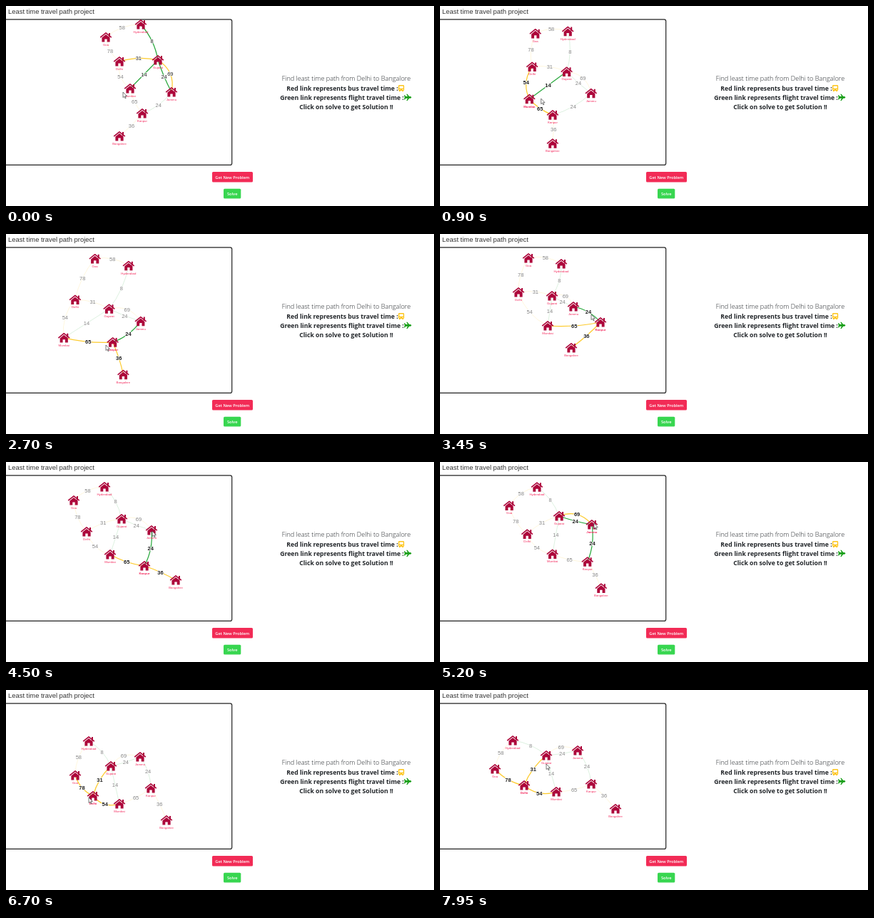
Animation, 600 px wide and 281 px high, one loop 8000 ms. Source, as an HTML page:

```html
<!DOCTYPE html>
<html lang="en">
<head>
<meta charset="utf-8">
<title>Least time travel path project</title>
<style>
  html, body { margin: 0; width: 100%; height: 100%; overflow: hidden; background: #fff; }
  svg { display: block; width: 100vw; height: 100vh; }
  text { text-anchor: middle; }
  .title { font: 9.42px "Liberation Sans", Arial, sans-serif; fill: #333; text-anchor: start; }
  .light { font: 300 9.15px "Open Sans", sans-serif; fill: #212529; }
  .bold { font: 700 8.7px "Open Sans", sans-serif; fill: #212529; }
  .button { font: 600 5.7px "Open Sans", sans-serif; fill: #fff; }
  .city { font: 4.3px "Liberation Sans", Arial, sans-serif; fill: #f3255a; }
  .cost { font: 7.5px "Liberation Sans", Arial, sans-serif; fill: #858585;
          stroke: #fff; stroke-width: 1.4px; paint-order: stroke; }
  .edge { fill: none; stroke-width: .8; opacity: .2; }
  .active .edge { stroke-width: 1.2; opacity: 1; }
  .active .cost { fill: #222; }
  .strong .cost, .strong .city { font-weight: 700; }
</style>
</head>
<body>
<svg viewBox="0 0 600 281" preserveAspectRatio="none">
  <defs>
    <g id="house" fill="#ad063b">
      <path d="M-7.8 .2L0-6.1L7.8 .2" fill="none" stroke="#ad063b" stroke-width="1.6" stroke-linejoin="round"/>
      <path d="M4-6H6V-.5H4ZM-5.6 .6L0-4L5.6 .6V6.6H1.7V2.4H-1.7V6.6H-5.6Z"/>
    </g>
  </defs>
  <text class="title" x="3" y="11.4">Least time travel path project</text>
  <rect x="-5" y="18.8" width="321.7" height="204.6" rx="2.5" fill="none" stroke="#222" stroke-width="1.2"/>

  <text class="light" x="477" y="105.4">Find least time path from Delhi to Bangalore</text>
  <text class="bold" x="471.5" y="118.6">Red link represents bus travel time :</text>
  <text class="bold" x="471" y="131.7">Green link represents flight travel time :</text>
  <text class="bold" x="477" y="145">Click on solve to get Solution !!</text>
  <g fill="#fdc51b">
    <rect x="550" y="111" width="8.2" height="8" rx="1.4"/>
    <path d="M551 118H553V120H551ZM555.2 118H557.2V120H555.2Z"/>
    <path d="M551.4 112.6H556.8V115.8H551.4ZM551.3 116.9H552.6V118H551.3ZM555.6 116.9H556.9V118H555.6Z" fill="#fff"/>
  </g>
  <path d="M558 125.3H559.2L560.5 127H563L561.3 123.7H562.8L565.2 127H566.7Q568.4 127.4 568.4 128.4Q568.4 129.4 566.7 129.8H565.2L562.8 133.1H561.3L563 129.8H560.5L559.2 131.5H558L558.8 128.4Z" fill="#1a9f1a"/>

  <rect x="289" y="233" width="57" height="14.6" rx="1.6" fill="#f22b56"/>
  <text class="button" x="317.3" y="242.5">Get New Problem</text>
  <rect x="305" y="256.7" width="24.3" height="13.8" rx="1.6" fill="#38d650"/>
  <text class="button" x="317.2" y="266">Solve</text>

  <g id="edges"></g>
  <g id="cities"></g>
  <path id="cursor" d="M0 0V7.6L1.8 6L3 8.8L4.2 8.3L3 5.6H5.4Z" fill="#fff" stroke="#444" stroke-width=".7"/>
</svg>
<script>
const LOOP = 8000, STEP = 50;
const YELLOW = '#fdcb2e', GREEN = '#28a83c';

const times = [0, 1950, 2400, 3450, 4500, 5850, 6700, 7950];
const cities = {
  Hyderabad: [[189,26], [172,44], [172,45], [170,42], [138,35], [134,36], [116,72], [102,71]],
  Goa:       [[140,44], [127,35], [125,35], [124,34], [95,54], [99,70], [97,120], [77,111]],
  Delhi:     [[159,78], [100,93], [94,95], [110,82], [113,98], [129,105], [122,149], [118,134]],
  Gujarat:   [[213,76], [146,107], [142,109], [157,87], [162,80], [170,74], [147,107], [149,92]],
  Mumbai:    [[174,116], [76,146], [64,150], [151,129], [146,130], [168,129], [159,160], [163,143]],
  Jammu:     [[232,121], [193,125], [190,127], [187,102], [204,96], [217,83], [188,94], [193,85]],
  Kanpur:    [[191,151], [132,156], [131,159], [225,124], [194,146], [218,135], [203,138], [212,132]],
  Bangalore: [[159,183], [157,204], [160,207], [184,160], [238,166], [215,185], [225,183], [246,167]]
};

// from, to, cost, sideways bend, colour
const links = [
  ['Goa', 'Hyderabad', 58, 5, YELLOW],
  ['Goa', 'Delhi', 78, -4, YELLOW],
  ['Delhi', 'Gujarat', 31, 3.5, YELLOW],
  ['Delhi', 'Mumbai', 54, -6.5, YELLOW],
  ['Hyderabad', 'Gujarat', 8, 4, GREEN],
  ['Gujarat', 'Mumbai', 14, 0, GREEN],
  ['Gujarat', 'Jammu', 69, 8.5, YELLOW],
  ['Gujarat', 'Jammu', 24, -1, GREEN],
  ['Jammu', 'Kanpur', 24, 3.8, GREEN],
  ['Mumbai', 'Kanpur', 65, -2.5, YELLOW],
  ['Kanpur', 'Bangalore', 36, 1.3, YELLOW]
];

const selections = [[0, 'Gujarat'], [150, 'Mumbai'], [2650, 'Kanpur'], [4550, 'Jammu'], [5900, 'Delhi']];

const cursorTimes = [0, 150, 1950, 2400, 2700, 3300, 3450, 4500, 5250, 5850, 6700, 7300, 7950];
const cursorPath = [[164,121], [172,118], [75,155], [64,158], [140,156], [222,126], [212,113],
  [205,97], [216,86], [129,107], [116,151], [113,142], [149,104]];

function add(parent, tag, attrs, text = '') {
  const el = document.createElementNS('http://www.w3.org/2000/svg', tag);
  for (const key in attrs) el.setAttribute(key, attrs[key]);
  el.textContent = text;
  return parent.appendChild(el);
}

function place(el, [x, y]) {
  el.setAttribute('transform', `translate(${x} ${y})`);
}

// Smooth curve through the keys that rests at every turning point
function follow(keys, points, t) {
  let i = 0;
  while (i < keys.length - 2 && t >= keys[i + 1]) i++;
  const span = keys[i + 1] - keys[i];
  const u = Math.min(1, (t - keys[i]) / span);
  return [0, 1].map(axis => {
    const p = k => points[k][axis];
    const rate = k => (p(k + 1) - p(k)) / (keys[k + 1] - keys[k]);
    const slope = k => {
      if (k === 0) return rate(0);
      if (k === keys.length - 1) return rate(k - 1);
      const before = rate(k - 1), after = rate(k);
      return before * after <= 0 ? 0 : 2 * before * after / (before + after);
    };
    return p(i) * (1 + 2 * u) * (1 - u) ** 2 + p(i + 1) * u * u * (3 - 2 * u)
      + span * u * (1 - u) * (slope(i) * (1 - u) - slope(i + 1) * u);
  });
}

const edgeLayer = document.getElementById('edges');
const cityLayer = document.getElementById('cities');
const cursor = document.getElementById('cursor');

const edges = links.map(([from, to, cost, bend, color]) => {
  const group = add(edgeLayer, 'g', {});
  const path = add(group, 'path', { class: 'edge', stroke: color });
  const label = add(group, 'text', { class: 'cost', y: 2.7 }, cost);
  return { from, to, bend, group, path, label };
});

const nodes = Object.entries(cities).map(([name, points]) => {
  const group = add(cityLayer, 'g', {});
  add(group, 'use', { href: '#house' });
  add(group, 'text', { class: 'city', y: 12 }, name);
  return { name, points, group };
});

function draw(t) {
  const selected = selections.filter(([start]) => start <= t).pop()[1];
  const strong = selected === 'Gujarat' ? '' : 'strong';
  const at = {};

  for (const { name, points, group } of nodes) {
    at[name] = follow(times, points, t);
    place(group, at[name]);
    group.setAttribute('class', name === selected ? strong : '');
  }

  for (const { from, to, bend, group, path, label } of edges) {
    const [ax, ay] = at[from], [bx, by] = at[to];
    const dx = bx - ax, dy = by - ay, length = Math.hypot(dx, dy);
    const ox = dy / length * bend, oy = -dx / length * bend;
    const mx = (ax + bx) / 2, my = (ay + by) / 2;
    path.setAttribute('d', `M${ax} ${ay}Q${mx + 2 * ox} ${my + 2 * oy} ${bx} ${by}`);
    place(label, [mx + ox, my + oy]);
    const active = from === selected || to === selected;
    group.setAttribute('class', active ? `active ${strong}` : '');
  }

  place(cursor, follow(cursorTimes, cursorPath, t));
}

const start = performance.now();
function frame() {
  const t = (performance.now() - start) % LOOP;
  draw(Math.floor(t / STEP) * STEP);
  requestAnimationFrame(frame);
}
frame();
</script>
</body>
</html>
```
